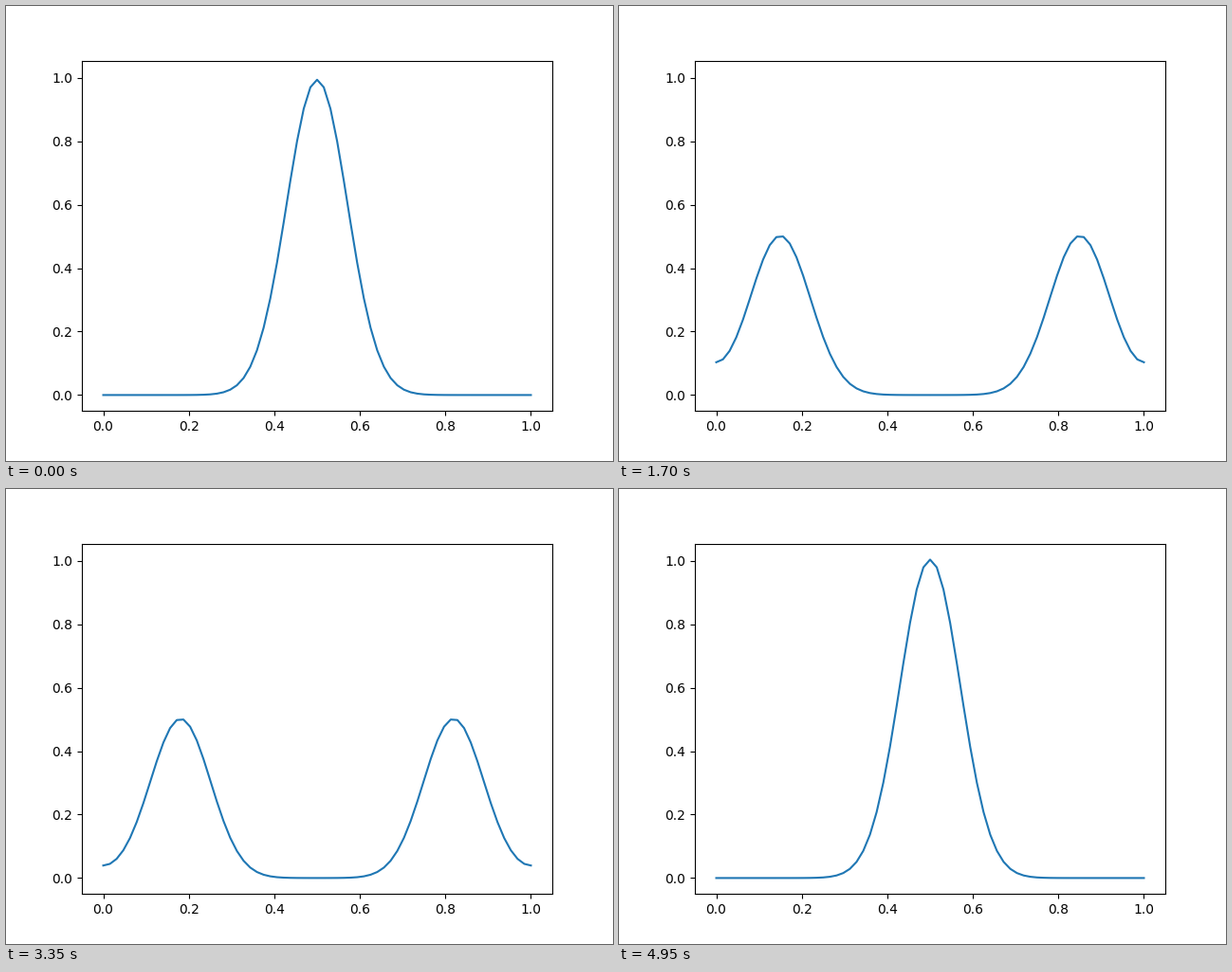
These frames come from a looping animation (640x480 px, 5000 ms). A matplotlib script:

```python
import numpy as np
import matplotlib.pyplot as plt
from matplotlib.animation import FuncAnimation

CELLS = 64
FRAMES = 100
DT = 0.01
INTERVAL = 50


def bump(x):
    return np.exp(-100 * (x - 0.5) ** 2)


def tridiagonal(diag, off):
    """Assemble a symmetric linear-element matrix on the unit interval."""
    n = CELLS + 1
    a = 2 * diag * np.eye(n) + off * (np.eye(n, k=1) + np.eye(n, k=-1))
    a[0, 0] = a[-1, -1] = diag
    return a


def project(f):
    """L2 projection with two Gauss points per cell."""
    load = np.zeros(CELLS + 1)
    for s in (0.5 - 0.5 / np.sqrt(3), 0.5 + 0.5 / np.sqrt(3)):
        values = f(x[:-1] + s * h) * h / 2
        load[:-1] += (1 - s) * values
        load[1:] += s * values
    return np.linalg.solve(mass, load)


def evolve(u):
    """Crank-Nicolson steps of the wave equation with free ends."""
    v = np.zeros_like(u)
    q = DT ** 2 / 4
    step = np.linalg.inv(mass + q * stiff)
    states = []
    for _ in range(FRAMES):
        u_next = step @ ((mass - q * stiff) @ u + DT * mass @ v)
        v = 2 * (u_next - u) / DT - v
        u = u_next
        states.append(u)
    return states


h = 1 / CELLS
x = np.linspace(0, 1, CELLS + 1)
mass = tridiagonal(h / 3, h / 6)
stiff = tridiagonal(1 / h, -1 / h)
start = project(bump)
states = evolve(start)

fig, ax = plt.subplots(figsize=(6.4, 4.8), dpi=100)
line, = ax.plot(x, start)
# Fix the limits set by the initial pulse.
ax.set_xlim(ax.get_xlim())
ax.set_ylim(ax.get_ylim())


def update(i):
    line.set_ydata(states[i])
    return line,


anim = FuncAnimation(fig, update, frames=FRAMES, interval=INTERVAL,
                     repeat=True, repeat_delay=0)
plt.show()
```
